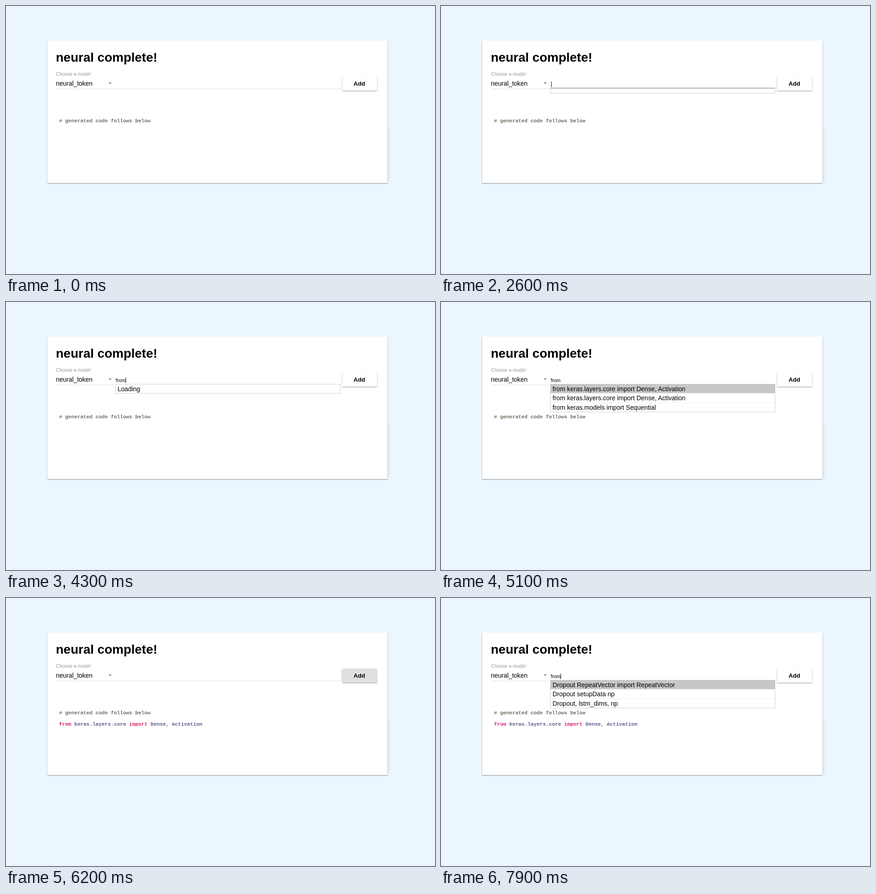
Animation, 947 px wide and 592 px high, one loop 8000 ms. Source, as an HTML page:

```html
<!DOCTYPE html>
<html lang="en">
<head>
<meta charset="utf-8">
<title>neural complete!</title>
<style>
  html, body { margin: 0; width: 100%; height: 100%; overflow: hidden; background: #ecf6fe; }
  svg { display: block; font: 14px "Liberation Sans", Arial, sans-serif; }
  text { white-space: pre; }
  .card { filter: drop-shadow(0 1px 1px rgba(0, 0, 0, .45)); }
  .button { filter: drop-shadow(0 1px 1px rgba(0, 0, 0, .42)); }
  .code { font: bold 11.23px "Liberation Mono", "Courier New", monospace; fill: #5d5d8c; }
  .code .keyword { fill: #d9266f; }
  .code .comment { fill: #716d62; }
  .small { font-size: 10.5px; }
</style>
</head>
<body>
<svg width="947" height="592" viewBox="0 0 947 592">
  <rect x="842" y="272" width="6" height="115" fill="#e5eef6"/>
  <rect class="card" x="91" y="76" width="751" height="315" rx="1" fill="#fff"/>
  <text x="110" y="123" font-size="28" font-weight="bold">neural complete!</text>
  <text class="small" x="110.3" y="153.5" fill="#969696">Choose a model</text>
  <text x="110.2" y="175.5">neural_token</text>
  <path d="M226 168.5h8l-4 4z" fill="#999"/>
  <path d="M111 183h127" stroke="#dcdcdc"/>
  <path id="underline" d="M242 183h497" stroke="#dcdcdc"/>

  <rect id="button" class="button" x="742" y="156" width="77" height="31" rx="2"/>
  <text x="780" y="175.7" font-size="13" font-weight="bold" text-anchor="middle">Add</text>

  <text id="typed" y="176.5"></text>
  <text id="tick" class="small" x="241.2" y="176.5">'</text>
  <rect id="caret" y="167" width="1.2" height="12" fill="#222"/>

  <g class="code">
    <text class="comment" x="117" y="257"># generated code follows below</text>
    <text id="generated" x="117" y="281.6"><tspan class="keyword">from</tspan> keras.layers.core <tspan class="keyword">import</tspan> Dense, Activation</text>
  </g>

  <g id="menu">
    <rect id="frame" x="241.5" y="181.5" width="496" fill="#fff" stroke="#cfcfcf"/>
    <rect id="highlight" x="241.5" y="181" width="496" fill="#c7c7c7"/>
    <path id="divider" d="M242 222.3h495" stroke="#eee"/>
    <text id="row0" x="246.3" y="196.7"></text>
    <text id="row1" x="246.3" y="217.2"></text>
    <text id="row2" x="246.3" y="237.7"></text>
  </g>
</svg>
<script>
const LOOP = 8000, ROW = 20.5;
const $ = id => document.getElementById(id);
const show = (id, on) => $(id).style.display = on ? '' : 'none';

const dense = 'from keras.layers.core import Dense, Activation';
const imports = [dense, dense, 'from keras.models import Sequential'];
const dropouts = ['Dropout RepeatVector import RepeatVector', 'Dropout setupData np', 'Dropout, lstm_dims, np'];
const loading = ['Loading'];

// Each step keeps the earlier values and overrides some of them.
const steps = [
  [0, { text: '', caret: false, menu: null, pressed: false, added: false, picked: false }],
  [2600, { caret: true, menu: [] }],
  [2800, { menu: null }],
  [3100, { caret: false }],
  [3400, { text: 'f', caret: true }],
  [3500, { text: 'fr' }],
  [3700, { text: 'from' }],
  [4200, { menu: loading }],
  [4700, { menu: imports }],
  [5100, { caret: false }],
  [5700, { text: dense, picked: true, menu: null }],
  [5800, { pressed: true }],
  [6000, { text: '', picked: false, added: true }],
  [6700, { pressed: false }],
  [6800, { caret: true }],
  [6900, { menu: loading }],
  [7100, { menu: dropouts }],
  [7600, { text: 'f' }],
  [7900, { text: 'from' }],
];

function drawMenu(rows) {
  show('menu', rows);
  show('underline', !rows);
  if (!rows) return;
  const empty = !rows.length;
  $('frame').setAttribute('height', empty ? 11 : rows.length * ROW);
  $('highlight').setAttribute('height', empty ? 3 : ROW);
  $('highlight').setAttribute('y', empty ? 180 : 181);
  show('highlight', rows !== loading);
  show('divider', rows.length > 1);
  for (let i = 0; i < 3; i++) $('row' + i).textContent = rows[i] || '';
}

function draw(time) {
  const state = Object.assign({}, ...steps.filter(([at]) => at <= time).map(([, patch]) => patch));
  const typed = $('typed'), left = state.picked ? 241 : 242.8;
  typed.textContent = state.text;
  typed.setAttribute('x', left);
  typed.setAttribute('font-size', state.picked ? 14 : 10.5);
  show('tick', state.text && !state.picked);
  show('caret', state.caret);
  $('caret').setAttribute('x', state.text ? left + typed.getComputedTextLength() : 243.2);
  $('button').setAttribute('fill', state.pressed ? '#e0e0e0' : '#fff');
  show('generated', state.added);
  drawMenu(state.menu);
}

const start = performance.now();
function tick() {
  draw((performance.now() - start) % LOOP);
  requestAnimationFrame(tick);
}
tick();
</script>
</body>
</html>
```
